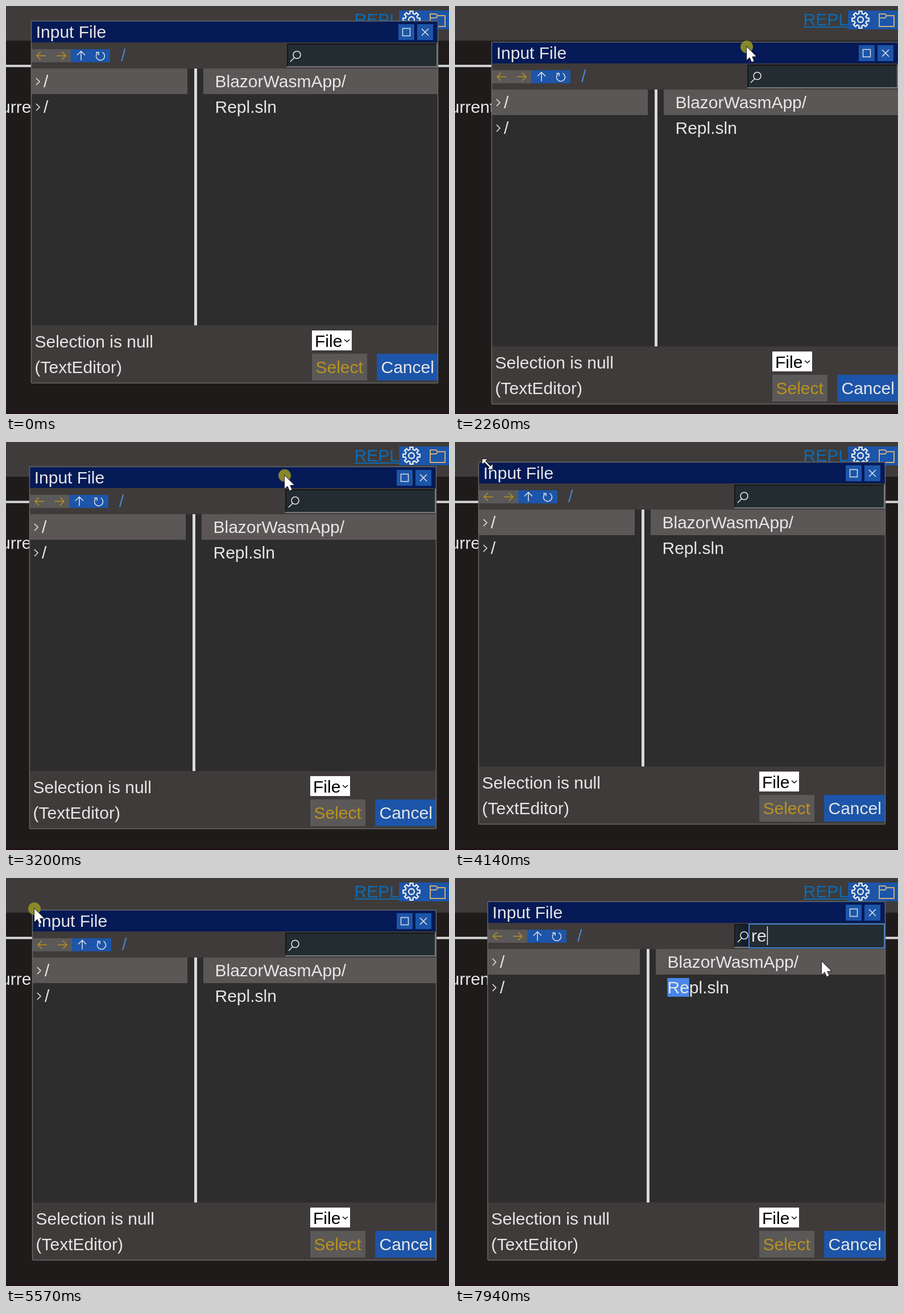
Write an HTML page with a canvas that moves like this. It is 779 px wide and 718 px high and loops after 8000 ms.

```html
<!DOCTYPE html>
<html lang="en">
<head>
<meta charset="utf-8">
<title>Input File dialog</title>
<style>
html, body { margin: 0; width: 100%; height: 100%; overflow: hidden; background: #1f1b1a; }
canvas { display: block; }
</style>
</head>
<body>
<canvas id="stage" width="779" height="718"></canvas>
<script>
const ctx = document.getElementById('stage').getContext('2d');
const LOOP = 8000, STEP = 1000 / 15, LAST_STEP = 119;
const COLOR = {
  page: '#1f1b1a', bar: '#3f3b3a', panel: '#2d2d2d', row: '#5b5756', title: '#051a56',
  blue: '#1c55a9', gray: '#5b5958', gold: '#b9921f', text: '#e6e6e6', line: '#d9d9d9'
};

const within = (k, from, to) => k >= from && k <= to;
const progress = (k, from, to) => Math.min(1, Math.max(0, (k - from) / (to - from)));
const glide = (k, from, to) => {
  const f = progress(k, from, to);
  return f * f * (3 - 2 * f);
};
const sway = (k, from, to) => Math.sin(Math.PI * progress(k, from, to)) ** 2;

// Eased pointer moves: from step, to step, destination.
const moves = [
  [1, 7, 535, 328], [11, 22, 485, 64], [22, 24, 493, 42], [30, 33, 513, 72],
  [34, 36, 500, 61], [36, 47, 490, 59], [50, 52, 490, 51], [53, 59, 68, 44],
  [60, 64, 45, 33], [75, 81, 50, 54], [83, 87, 66, 57], [90, 93, 61, 39],
  [96, 103, 512, 97], [103, 105, 560, 102], [106, 109, 645, 147]
];

function pointer(k) {
  let x = 723, y = 730;
  for (const [from, to, toX, toY] of moves) {
    const f = glide(k, from, to);
    x += (toX - x) * f;
    y += (toY - y) * f;
  }
  x += 45 * sway(k, 11, 20) - 18 * sway(k, 27, 33) - 45 * sway(k, 36, 47) + 109 * sway(k, 69, 81);
  y += 36 * sway(k, 27, 34) + 64 * sway(k, 71, 80);
  return [x, y];
}

// The dialog follows the pointer one step late, first moved, then resized by its corner.
function dialogRect(k) {
  const resizing = k >= 69;
  const [x, y] = pointer(resizing ? Math.min(k - 1, 93) : Math.min(Math.max(k - 1, 24), 52));
  const L = Math.round(resizing ? x - 4 : x - 449);
  const T = Math.round(resizing ? y + 2 : y - 16);
  return resizing ? [L, T, 757, 673] : [L, T, L + 716, T + 638];
}

function box(color, x, y, w, h) {
  ctx.fillStyle = color;
  ctx.fillRect(x, y, w, h);
}

function label(str, x, baseline, color = COLOR.text) {
  ctx.fillStyle = color;
  ctx.fillText(str, x, baseline);
}

function stroke(color, width, ...lines) {
  ctx.strokeStyle = color;
  ctx.lineWidth = width;
  ctx.beginPath();
  for (const pts of lines)
    for (let i = 0; i < pts.length; i += 2) ctx[i ? 'lineTo' : 'moveTo'](pts[i], pts[i + 1]);
  ctx.stroke();
}

function ring(color, width, x, y, r, from = 0, to = 2 * Math.PI) {
  ctx.strokeStyle = color;
  ctx.lineWidth = width;
  ctx.beginPath();
  ctx.arc(x, y, r, from, to);
  ctx.stroke();
}

function arrow(color, x, y, angle) {
  ctx.save();
  ctx.translate(x, y);
  ctx.rotate(angle);
  stroke(color, 1.5, [-8, 0, 8, 0], [1, -7, 8, 0, 1, 7]);
  ctx.restore();
}

function gear(x, y) {
  const pts = [];
  for (let i = 0; i < 8; i++)
    for (const [off, r] of [[-.24, 11], [-.17, 15], [.17, 15], [.24, 11]]) {
      const a = i * Math.PI / 4 + off;
      pts.push(x + r * Math.cos(a), y + r * Math.sin(a));
    }
  pts.push(pts[0], pts[1]);
  stroke('#ececec', 2.3, pts);
  ring('#ececec', 2.3, x, y, 5);
}

function drawPage() {
  box(COLOR.page, 0, 0, 779, 718);
  box(COLOR.bar, 0, 0, 779, 61);
  box(COLOR.line, 0, 103.5, 779, 4);
  box('#24121c', 0, 715, 779, 3);
  ctx.textAlign = 'right';
  label('Currently', 91, 188);
  ctx.textAlign = 'left';
  label('REPL', 612.5, 33.5, '#0b6cb6');
  box('#0b6cb6', 613, 36, 78, 2);
  box(COLOR.blue, 691, 8, 88, 33);
  gear(713, 24);
  stroke('#c9ad7c', 2, [746, 36, 746, 14, 756, 14, 759, 17, 772, 17, 772, 36, 745, 36],
    [746, 21, 756, 21, 759, 18]);
}

function drawTitle(L, T, R) {
  box(COLOR.title, L + 1, T + 1, R - L - 2, 37);
  label('Input File', L + 8.7, T + 30);
  box(COLOR.blue, R - 70, T + 6, 28, 28);
  box(COLOR.blue, R - 37, T + 6, 28, 28);
  ctx.strokeStyle = COLOR.text;
  ctx.lineWidth = 1.4;
  ctx.strokeRect(R - 62.5, T + 13.5, 13, 13);
  stroke(COLOR.text, 1.5, [R - 29, T + 14, R - 17, T + 26], [R - 17, T + 14, R - 29, T + 26]);
}

function drawToolbar(L, T) {
  box(COLOR.gray, L + 1, T + 50, 69, 23);
  box(COLOR.blue, L + 70, T + 50, 69, 23);
  const y = T + 61.5;
  arrow(COLOR.gold, L + 18, y, Math.PI);
  arrow(COLOR.gold, L + 53, y, 0);
  arrow(COLOR.text, L + 88, y, -Math.PI / 2);
  ring(COLOR.text, 1.5, L + 122, y + .5, 7.5, -1.1, 4);
  stroke(COLOR.text, 1.5, [L + 114, y - 6, L + 119, y - 6, L + 119, y - 1]);
  label('/', L + 158, T + 71, '#4a83cf');
}

function drawSearch(T, R, k) {
  const x = R - 266, y = T + 40;
  box('#222c31', x, y, 265, 42);
  stroke('#141719', 2, [x + 1, y + 42, x + 1, y + 1, R - 1, y + 1]);
  stroke('#777b7d', 2, [x, y + 41, R - 2, y + 41, R - 2, y]);
  const focused = k >= 105;
  if (focused) {
    const shade = ctx.createLinearGradient(x, 0, x + 25, 0);
    shade.addColorStop(0, '#222c31');
    shade.addColorStop(1, '#101b2a');
    box(shade, x + 2, y + 2, 23, 38);
    box('#222c31', x + 25, y - 1, 240, 44);
    ctx.strokeStyle = '#427fd0';
    ctx.lineWidth = 2;
    ctx.strokeRect(x + 26, y, 238, 42);
  }
  ring(COLOR.text, 1.6, x + 17.5, y + 20, 6.5);
  stroke(COLOR.text, 1.6, [x + 13, y + 25, x + 6, y + 32]);
  if (!focused) return;
  const typed = 're'.slice(0, Math.max(0, k - 117));
  label(typed, x + 30, y + 31);
  if (!within(k, 113, 117)) {
    box(COLOR.text, x + 31 + ctx.measureText(typed).width, y + 4, 1.5, 33);
  }
}

function drawFile(name, match, x, baseline) {
  const start = name.toLowerCase().indexOf(match);
  if (match && start >= 0) {
    const width = (from, to) => ctx.measureText(name.slice(from, to)).width;
    box('#4a86e8', x + width(0, start), baseline - 27, width(start, start + match.length), 33);
  }
  label(name, x, baseline);
}

function drawBody(L, T, R, B, k) {
  const top = T + 84, split = Math.ceil(L + .4 * (R - L));
  box(COLOR.panel, L + 1, top, R - L - 2, B - 102 - top);
  box(COLOR.row, L + 1, top, split - 12 - L - 1, 45);
  box(COLOR.row, split + 16, top, R - 1 - split - 16, 45);
  box(COLOR.line, split, top, 5, B - 102 - top);
  for (const y of [top, top + 45]) {
    stroke(COLOR.text, 1.5, [L + 9, y + 17, L + 15, y + 23, L + 9, y + 29]);
    label('/', L + 22, y + 33);
  }
  const match = 're'.slice(0, Math.max(0, k - 117));
  drawFile('BlazorWasmApp/', match, split + 36.5, T + 117);
  drawFile('Repl.sln', match, split + 36.5, T + 162);
}

function drawFooter(L, R, B) {
  label('Selection is null', L + 6.5, B - 63);
  label('(TextEditor)', L + 6.5, B - 18);
  box('#fff', R - 222, B - 93, 70, 35);
  label('File', R - 217, B - 64, '#000');
  stroke('#000', 1.5, [R - 165, B - 77, R - 160.5, B - 73, R - 156, B - 77]);
  box(COLOR.gray, R - 222, B - 52, 97, 47);
  label('Select', R - 215.5, B - 18, COLOR.gold);
  box(COLOR.blue, R - 108, B - 52, 107, 47);
  label('Cancel', R - 100.5, B - 18);
}

function drawDialog(k) {
  const [L, T, R, B] = dialogRect(k);
  box(COLOR.bar, L, T, R - L, B - T);
  drawTitle(L, T, R);
  drawToolbar(L, T);
  drawBody(L, T, R, B, k);
  drawSearch(T, R, k);
  drawFooter(L, R, B);
  ctx.strokeStyle = '#686868';
  ctx.lineWidth = 1.5;
  ctx.beginPath();
  ctx.roundRect(L + .5, T + .5, R - L - 1, B - T - 1, 2);
  ctx.stroke();
}

function shape(pts) {
  ctx.beginPath();
  for (let i = 0; i < pts.length; i += 2) ctx.lineTo(pts[i], pts[i + 1]);
  ctx.closePath();
  ctx.lineWidth = 1.6;
  ctx.strokeStyle = '#111';
  ctx.stroke();
  ctx.fillStyle = '#fff';
  ctx.fill();
}

function drawPointer(k) {
  ctx.save();
  ctx.translate(...pointer(k).map(Math.round));
  if (within(k, 62, 68) || within(k, 93, 96)) {
    ctx.rotate(Math.PI / 4);
    shape([-12.5, 0, -6.5, -6, -6.5, -1.2, 6.5, -1.2, 6.5, -6, 12.5, 0,
      6.5, 6, 6.5, 1.2, -6.5, 1.2, -6.5, 6]);
  } else {
    const pressed = within(k, 23, 51) || within(k, 69, 92) || within(k, 104, 105);
    if (pressed) {
      ctx.fillStyle = 'rgba(148, 147, 38, .9)';
      ctx.beginPath();
      ctx.arc(0, 0, 11, 0, 2 * Math.PI);
      ctx.fill();
    }
    shape([0, 0, 0, 23, 5.2, 18.3, 8.8, 26.5, 12.6, 24.8, 9.2, 17, 16.5, 16.5]);
  }
  ctx.restore();
}

function draw(now) {
  const k = Math.min(LAST_STEP, Math.floor((now % LOOP + 8) / STEP));
  ctx.font = '30px "Liberation Sans", Arial, sans-serif';
  drawPage();
  drawDialog(k);
  drawPointer(k);
}

let start;
function tick(now) {
  start ??= now;
  draw(now - start);
  requestAnimationFrame(tick);
}
draw(0);
requestAnimationFrame(tick);
</script>
</body>
</html>
```
